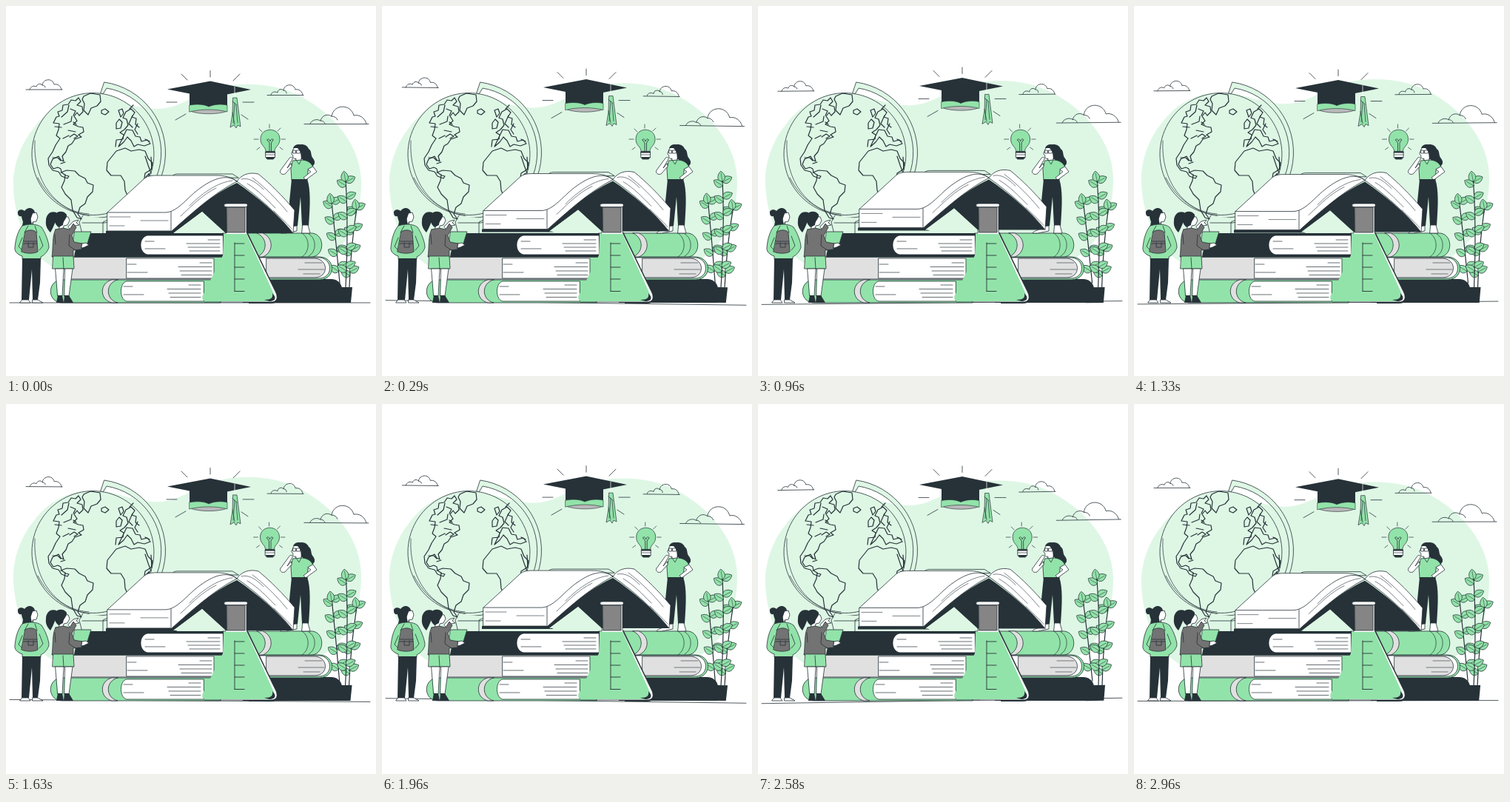
Recreate the animation shown at these times as an HTML page with a canvas. Size 500x500 px, loop 3 s.

```html
<!DOCTYPE html>
<html lang="en">
<head>
<meta charset="utf-8">
<title>Study scene</title>
<style>
  html, body { margin: 0; width: 100%; height: 100%; overflow: hidden; background: #fff; }
  canvas { display: block; width: 500px; height: 500px; }
</style>
</head>
<body>
<canvas id="stage"></canvas>
<script>
const LOOP = 3000;
const DARK = '#263238', GREEN = '#92e3a9', MINT = '#def7e5', WHITE = '#fff';
const GRAY = '#737373', PALE = '#e0e0e0';

const canvas = document.getElementById('stage');
const ctx = canvas.getContext('2d');
const scale = window.devicePixelRatio || 1;
canvas.width = canvas.height = 500 * scale;

// ---- drawing helpers ----
const cache = {};
function shape(d, fill, line = DARK, width = 0.8) {
  const path = cache[d] || (cache[d] = new Path2D(d));
  if (fill) { ctx.fillStyle = fill; ctx.fill(path); }
  if (line) { ctx.strokeStyle = line; ctx.lineWidth = width; ctx.stroke(path); }
}
const solid = (d, fill) => shape(d, fill, null);
const stroke = (d, width = 0.8, color = DARK) => shape(d, null, color, width);

function moved(x, y, draw) {
  ctx.save();
  ctx.translate(x, y);
  draw();
  ctx.restore();
}
function turned(deg, x, y, draw) {
  ctx.save();
  ctx.translate(x, y);
  ctx.rotate(deg * Math.PI / 180);
  ctx.translate(-x, -y);
  draw();
  ctx.restore();
}

// ---- motion curves ----
const phase = (t, period) => (t % period) / period;
const bob = p => 1 - Math.abs(2 * p - 1);
const sway = p => p < 0.25 ? 4 * p : p < 0.75 ? 2 - 4 * p : 4 * p - 4;
const SHAKE = [0, -1, 2, -4, 4, -4, 4, -4, 2, -1, 0];
function shake(p) {
  const i = Math.floor(p * 10), f = p * 10 - i;
  return SHAKE[i] + (SHAKE[i + 1] - SHAKE[i]) * f;
}

// ---- scene parts ----
function blob() {
  solid('M10 240C10 212 22 184 36 167C56 139 84 124 116 124C150 124 172 139 204 139C236 139 256 117 292 109C328 102 368 106 398 122C444 146 480 190 480 238C480 288 464 322 428 346C380 362 100 362 62 352C28 332 10 285 10 240Z', MINT);
}

function clouds() {
  stroke('M27 113H76M32 113C33 109 37 107 41 109C42 105 47 104 49 107C50 98 63 97 65 106C70 105 74 108 75 113M49 107C51 107 53 108 53 110');
  stroke('M353 120.5H402M358 120C359 116 363 115 367 117C367 113 372 111 375 114C376 105 389 104 391 113C396 112 400 115 401 120M375 114C378 114 379 116 379 118');
  stroke('M403 159.500H490M411 159C413 154 420 152 425 155C427 148 434 145 440 149C443 132 466 132 470 148C477 146 485 151 487 159M440 149C444 149 447 151 448 154M425 155C429 155 430 157 431 159');
}

function globe() {
  shape('M133 103A92 92 0 1 1 106 293L107 285A85 85 0 0 0 136 111L131 119L128 118Z', MINT);
  shape('M117.500 117.500A82.500 82.500 0 1 1 117.400 117.500Z', MINT);
  stroke('M39 182C36 236 66 276 113 284M43 232C58 262 84 279 112 281', 0.7);
  shape('M104 283L99 292L103 308H131V292L140 288', MINT);
  stroke('M103 293H131');
  const coast = d => stroke(d, 1.2);
  // the Americas
  coast('M64 158l4-8 4-1-2-6 6-2 1-7 7-1 4-6 6 1 4-4 3 5-5 5 7 2 1 7-5 5-3-4-4 5 4 6-5 5 7 3 6 1 1 6-7 4 4 3-9 3-4 6-5 3-3 8-5 6 2 7-4-2-3-5-8 4-3 7 4 6 6-2 4 2 1 5 6 4 4 1-2 3-8-3-4-6-8-2-5-7-1-9 6-9 4-9 6-9-5-4 3-8 1-8Z');
  coast('M75 150l8-7 2-9M78 160l10-4 1-7M84 168l10 2M87 139l7 3-3 6M66 163l9 1M77 179l8-4');
  coast('M63 205l7 0 4 4M74 213l6-2M86 177l6-4 5 3-5 3M91 157l4 3');
  coast('M74 225l8-3 11 1 6 6 8 4 3 6 8 3-1 9-7 7-3 9-7 5-3 9 5 7-6-2-6-10-2-14-8-8-5-9 4-9 1-8');
  // northern islands
  coast('M105 122l9-4 13 2 1 9-5 6-8 3-4 9-6-6 1-9-3-6Z');
  coast('M129 141l5-2 5 4-5 4-5-2Z');
  // Europe, Africa, Asia
  coast('M148 190l1-9 9-1 1-6-5-3 6-4 5-6-2-8-5-2 4-8 7-4 5 5-4 6 6 2-1 8 5 4M163 167l8 1 4 8 6 1 2 6 8-2 4 5-8 3-9-2-5 3-4-8-5-5-5 7-7 6Z');
  coast('M149 158l4-5 4 4-2 8-6 1ZM152 141l5-2 2 6-4 5ZM171 148l-5 11 5 5M178 159l-4 8 4 6M167 139l5-5');
  coast('M149 196l12-4 8 4 11-2 8 2 4 10 6 6-2 9-8 5-2 13-8 10-5 8-8 1-4-9-1-12-5-8-13 0-6-7 1-11Z');
  coast('M188 203l4 12 4 11M196 204l1 17M194 226l-5 5-3 10 4-1ZM188 180l6 3');
}

function leaf(x, y, angle) {
  ctx.save();
  ctx.translate(x, y);
  ctx.rotate(angle);
  shape('M0 0C1-7 9-7 14 0C9 6 2 6 0 0Z', GREEN, DARK, 0.7);
  stroke('M0 0H11', 0.5);
  ctx.restore();
}
function stem(x0, y0, cx, cy, x1, y1, pairs) {
  stroke(`M${x0} ${y0}Q${cx} ${cy} ${x1} ${y1}`, 1.2);
  for (let i = 0; i < pairs; i++) {
    const k = 0.14 + 0.8 * i / (pairs - 1), m = 1 - k;
    const x = m * m * x0 + 2 * m * k * cx + k * k * x1;
    const y = m * m * y0 + 2 * m * k * cy + k * k * y1;
    leaf(x, y, -2.6);
    leaf(x, y - 5, -0.5);
  }
  leaf(x1, y1 + 2, -1.75);
}
function plant() {
  stem(451, 374, 446, 318, 440, 265, 5);
  stem(464, 380, 466, 324, 474, 273, 4);
  stem(459, 380, 463, 300, 459, 235, 6);
  solid('M442 380H468L466 401H442Z', DARK);
}

// sparse strokes near the two ends of a block of pages
function pageLines(x0, x1, y, rows, gap) {
  let d = '';
  for (let i = 0; i < rows; i++) {
    const yy = y + i * gap, a = 12 + (i * 17) % 19, b = 18 + (i * 29) % 31;
    d += `M${x1 - b} ${yy}H${x1 - 2}`;
    if (i % 2 === 0) d += `M${x0} ${yy + 2}h${a}`;
  }
  stroke(d, 0.7);
}

function stack() {
  // bottom volume
  shape('M76 370H290V401H76C55 401 55 370 76 370Z', GREEN);
  shape('M143 370C126 374 126 397 143 401H151C134 397 134 374 151 370Z', PALE);
  shape('M267 372H163C153 374 153 397 163 399H267Z', WHITE);
  pageLines(159, 265, 377, 4, 5.5);
  solid('M320 369H440C450 370 453 376 454 381V401H320Z', DARK);
  // middle volume
  shape('M88 339.500H300V369H88Z', PALE);
  solid('M281 340H300V369H281Z', GREEN);
  shape('M163 341H281V368H163Z', WHITE);
  pageLines(164, 280, 347, 4, 5.5);
  shape('M330 339H424C446 340 446 369 424 370H330Z', GREEN);
  shape('M340 340H424C442 342 442 367 424 368H340Z', WHITE);
  shape('M352 341H418C436 343 436 366 418 367H352Z', PALE);
  stroke('M404 347H427M395 356H430M402 362H424', 0.6);
  // top volume
  solid('M110 307H294V339H92C94 325 99 312 110 307Z', DARK);
  shape('M293 310H191C179 313 179 333 191 336H293Z', WHITE);
  pageLines(188, 291, 316, 4, 5);
  shape('M325 307H414C431 309 431 337 414 339H325Z', GREEN);
  shape('M339 307C354 313 354 333 339 339H347C362 333 362 313 347 307Z', PALE);
  stroke('M409 308C420 314 420 332 409 338M400 307C411 314 411 332 400 339', 0.7);
}

function openBook() {
  shape('M224 231C226 227 230 227 234 227H306L314 232Z', MINT);
  solid('M135 304H222L232 308H135Z', DARK);
  solid('M222 305C240 285 280 254 312 239C340 258 368 282 388 307H297L265 278L225 308Z', DARK);
  solid('M226 307L265 278L296 307Z', MINT);
  // left pages
  shape('M137 279L186 234C190 230 196 229 203 229H284C294 229 305 231 312 237C279 254 250 281 224 304H137Z', WHITE);
  stroke('M137 279H216C233 278 246 257 264 245C282 232 300 227 312 237M223 278V303');
  stroke('M140 285H168M182 290H219M140 297H160', 0.6);
  stroke('M236 284C254 267 266 255 284 246M248 270C268 250 288 238 306 236', 0.6);
  // right pages
  shape('M312 237C318 228 328 224 341 227C357 240 374 257 390 276L388 307C370 284 342 258 312 237Z', WHITE);
  stroke('M318 234C329 231 339 239 348 248M326 240C341 249 352 261 364 273M333 232C349 244 366 261 380 278M362 277C371 286 379 293 386 301', 0.6);
}

function flask() {
  solid('M326 305L367 390C370 398 366 402 358 402H328Z', DARK);
  solid('M298 270H325V306L365 388C368 396 365 400 358 400H300Z', WHITE);
  solid('M294 308H325L361 387C364 394 361 399 354 399H272C266 399 264 396 266 391L293 337Z', GREEN);
  stroke('M297 271V307H293M325 271V306L365 388C368 396 365 400 358 400H268');
  solid('M349 397C359 397 361 394 360 388L363 392C365 397 361 399 356 399Z', DARK);
  shape('M299 272H323V306H299Z', '#858585');
  shape('M297 267H324C327 267 327 271.500 324 271.500H297C294 271.500 294 267 297 267Z', WHITE);
  stroke('M309 320V385.500M309 321H322M309 337H322M309 353H322M309 369H322M309 385.500H322', 0.9);
}

function thinker() {
  // hair, head, glasses
  solid('M392 190C396 185 407 186 409 193C414 196 411 202 415 206C419 211 417 217 411 217C405 218 401 213 401 207Z', DARK);
  shape('M389 192C395 189 400 194 400 200C400 204 399 206 398 210H391L392 206C389 207 387 205 388 202L386 200Z', WHITE);
  solid('M388 192C390 186 400 185 403 192L404 207L399 207L398 197L394 192Z', DARK);
  stroke('M388 195h3.500v4h-3.500ZM393 195h4.500v4h-4.500ZM398 196L402 195', 0.8);
  // arms and body
  shape('M388 209L399 208C407 208 413 212 415 218L408 222L407 236H386L385 220Z', GREEN);
  shape('M415 217L420 224L405 235L402 232L412 224L408 221Z', WHITE);
  shape('M386 217L377 227C373 229 369 225 371 222L382 207C384 203 388 204 387 207L380 219L385 213Z', WHITE);
  stroke('M392 208L396 214L399 208', 0.7);
  // legs
  solid('M386 234H407C412 248 411 270 409 297H400L398 258L394 297L384 299L383 264Z', DARK);
  shape('M385 298L393 297V304L378 307H371C373 303 380 304 385 298Z', WHITE);
  shape('M401 296H408L411 307H400Z', WHITE);
}

function backpacker() {
  solid('M16 280C15 275 22 274 25 277C30 270 38 273 39 279L36 285L37 296H23C24 291 21 288 21 284C18 285 16 283 16 280Z', DARK);
  shape('M36 280L41 279L43 285L41 291L36 292L36 298H30L33 288Z', WHITE);
  solid('M24 286L33 285C34 290 34 293 36 297H22Z', DARK);
  shape('M22 297C30 294 42 294 48 299C53 306 58 319 58 326C56 333 51 337 47 339V342H22V338C16 336 11 332 12 326C13 315 16 304 22 297Z', GREEN);
  stroke('M45 311L50 324L45 330M22 313L17 325L23 331M30 297L25 306M39 297L42 306');
  shape('M26 305C30 302 38 302 41 306L43 332C38 335 27 335 21 332Z', GRAY);
  stroke('M24 318H42M24 321H42M30 320V326H37V320');
  solid('M22 341H47L46 374L43 397H36L35 356L31 397H21Z', DARK);
  shape('M22 397H30L33 401H19Z', WHITE);
  shape('M36 397H43L50 401H36Z', WHITE);
}

function pointer() {
  solid('M68 279C61 276 54 281 54 290C53 297 56 302 60 306C64 300 67 291 68 286Z', DARK);
  shape('M78 284L84 285L86 290L83 296L78 297L77 303H71Z', WHITE);
  solid('M66 282C70 276 79 277 82 282C83 287 77 290 77 296L71 299C65 294 64 287 66 282Z', DARK);
  shape('M84 298L91 291L98 289L95 293L99 296L93 297L88 303Z', WHITE);
  shape('M93 305H115L110 321H90Z', GREEN);
  shape('M67 302L77 300L86 302L91 294L95 299L89 310L92 319L103 321L102 329L91 330V339H62C64 328 62 311 67 302Z', GRAY);
  stroke('M86 309L85 324L94 330M66 309L67 322');
  shape('M103 321L108 320L112 323L106 326L102 327Z', WHITE);
  shape('M64 338H91L92 355H63Z', GREEN);
  shape('M67 355H78L76 392H70Z', WHITE);
  shape('M80 355H90L85 392H79Z', WHITE);
  solid('M70 391H76L78 401H68Z', DARK);
  solid('M79 391H85L91 401H78Z', DARK);
  stroke('M77 340L78 355');
}

function cap() {
  stroke('M237 92L245 100M276 87.500V96M316 92L307 101M217 130H231M320 130H335M243 146L229 154M318 147L327 153');
  solid('M248 116H299V142C286 138 263 138 248 142Z', DARK);
  shape('M249 142C264 138 284 138 299 142C288 147 260 147 249 142Z', '#b9b9b9', DARK, 0.6);
  shape('M248 134C259 132 268 133 274 136C281 133 290 132 299 134V143C284 139 264 139 248 143Z', GREEN, DARK, 0.6);
  solid('M218 112.500L276 101.500L331 113L276 124Z', DARK);
  stroke('M309 109V125', 0.7, WHITE);
  shape('M307 124H312L317 163L313 161L311 165L308 161L303 164L306 146Z', GREEN, DARK, 0.7);
  stroke('M306 129L312 134M309 131L307 158M311 134L313 158M306 144L309 160', 0.7);
}

function bulb() {
  stroke('M356 160V165M342 166L346 170M371 165L367 169M335 180H341M372 180H377.500M339 194L343 191M374 194L370 191', 0.7);
  shape('M351 196C351 190 344 189 344 180C344 163 370 163 370 180C370 189 363 190 363 196Z', GREEN, DARK, 0.7);
  stroke('M356 196V185L353 181M358.500 196V185L361 181M353 181C354 178 356 180 357 183C358 180 360 178 361 181', 0.8);
  shape('M351 197H363.500V205L361 207H353L351 205Z', WHITE);
  solid('M350.500 196.500H364V198.500H350.500ZM351 204H363.500L361 207H353Z', DARK);
  stroke('M351 201H363.500', 0.7);
}

function render(t) {
  const slow = phase(t, LOOP), quick = phase(t, LOOP / 2);
  const lift = -6.4 * bob(quick), tilt = sway(quick);

  ctx.setTransform(scale, 0, 0, scale, 0, 0);
  ctx.fillStyle = WHITE;
  ctx.fillRect(0, 0, 500, 500);
  ctx.lineCap = ctx.lineJoin = 'round';

  moved(0, -7.5 * bob(slow), blob);
  turned(tilt, 258, 130, clouds);
  turned(tilt, 249, 401, () => stroke('M5 401H492'));
  globe();
  turned(tilt, 458, 311, plant);
  stack();
  thinker();
  moved(0, lift, openBook);
  flask();
  backpacker();
  pointer();
  moved(0, lift, cap);
  moved(shake(slow), 0, bulb);
}

function frame() {
  render(performance.now() % LOOP);
  requestAnimationFrame(frame);
}
frame();
</script>
</body>
</html>
```
